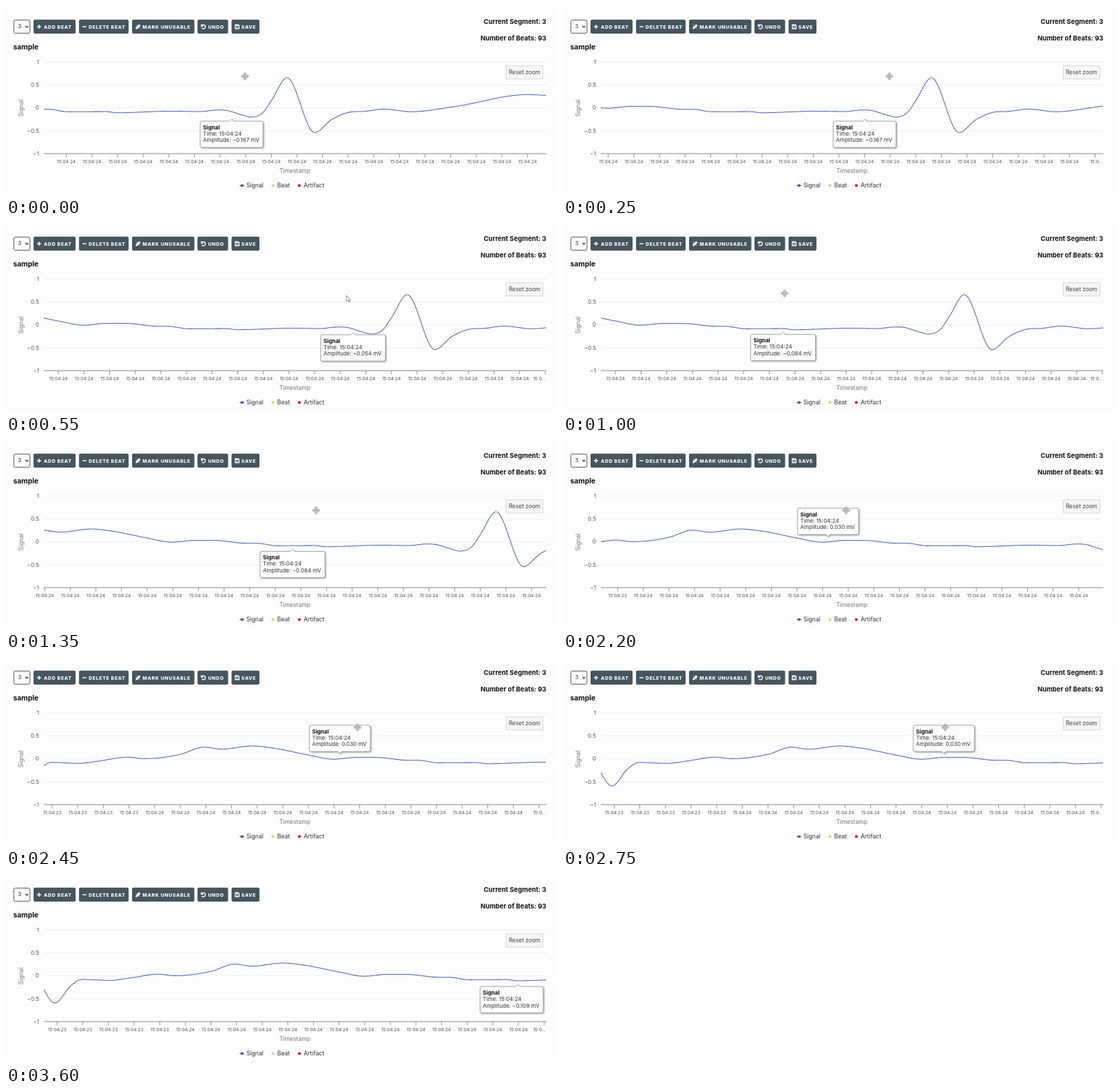
An HTML page that plays this animation: 800x274 px, repeating every 3650 ms.

```html
<!DOCTYPE html>
<html lang="en">
<head>
<meta charset="utf-8">
<title>Signal chart</title>
<style>
  html, body { margin: 0; width: 100%; height: 100%; overflow: hidden; background: #fdfcfe; }
  svg { display: block; width: 100vw; height: 100vh; font-family: Inter, "Open Sans", sans-serif; }
  .head { font-weight: 700; font-size: 9.5px; fill: #111; }
  .btn text { font-weight: 800; font-size: 6.8px; letter-spacing: .75px; fill: #fff; }
  .btn path { stroke: #fff; fill: none; stroke-width: 1.4; }
  .btn .solid { fill: #fff; stroke-width: .5; }
  .axis { font-size: 8.2px; fill: #555; }
  .name { font-size: 8.6px; fill: #777; }
  .time { font-size: 6.6px; fill: #555; text-anchor: middle; }
  .key { font-size: 8.6px; fill: #333; }
  .tip text { font-size: 8px; fill: #333; }
</style>
</head>
<body>
<svg viewBox="0 0 800 274">
  <rect width="800" height="274" fill="#fdfcfe"/>
  <rect x="11.4" y="20.4" width="23.4" height="19" rx="2" fill="#fff" stroke="#444" stroke-width=".9"/>
  <text x="17.6" y="32.4" font-size="7.8" fill="#222">3</text>
  <path d="M28.3 28.9l2 2 2-2" fill="none" stroke="#222" stroke-width="1.2"/>
  <g id="buttons" class="btn"></g>
  <text class="head" x="784.5" y="26" text-anchor="end">Current Segment: 3</text>
  <text class="head" x="784.5" y="49.5" text-anchor="end">Number of Beats: 93</text>
  <text class="head" x="10.5" y="63" style="font-size:10.3px">sample</text>
  <g id="grid"></g>
  <text class="name" x="419.5" y="242" text-anchor="middle">Timestamp</text>
  <text class="name" transform="translate(25.2 148) rotate(-90)" text-anchor="middle">Signal</text>
  <g id="times"></g>
  <path d="M55 214H784.5" stroke="#858a85"/>
  <clipPath id="plot"><rect x="55" y="78" width="729.5" height="138"/></clipPath>
  <g clip-path="url(#plot)">
    <path id="wave" fill="none" stroke="#5366ac" stroke-width="1.05" stroke-linejoin="round"/>
    <circle id="beat" r="2" fill="#efc685"/>
  </g>
  <path d="M339 260.3h7.4" stroke="#4a62ad" stroke-width="1.1"/>
  <g id="legend"></g>
  <rect x="726.2" y="86.8" width="53.4" height="19" fill="#f6f6f7" stroke="#d2d2d4" stroke-width=".9"/>
  <text x="752.9" y="99.2" font-size="8.3" fill="#444" text-anchor="middle">Reset zoom</text>
  <g id="tip" class="tip">
    <path id="box" fill="#fdfdfd" stroke="#999" stroke-width=".8" style="filter:drop-shadow(1px 1px 1px rgba(0,0,0,.4))"/>
    <text x="4" y="11.6" font-weight="700" style="fill:#111">Signal</text>
    <text x="4" y="21">Time: 15:04:24</text>
    <text id="amp" x="4" y="30.4"></text>
  </g>
  <g id="cursor" fill="#fff" stroke="#777" stroke-width=".8" stroke-linejoin="round">
    <path id="arrow" d="M0 0V8.6L2 6.8 3.5 9.8 4.8 9.2 3.4 6.3H6Z"/>
    <path id="move" d="M0-5.4L2-3.2H.7V-.7H3.2V-2L5.4 0 3.2 2V.7H.7V3.2H2L0 5.4-2 3.2H-.7V.7H-3.2V2L-5.4 0-3.2-2V-.7H-.7V-3.2H-2Z"/>
  </g>
</svg>
<script>
const LOOP = 3650, STEP = 50, LEFT = 55, RIGHT = 784.5;
const PAN_LAG = 65, HOVER_LAG = 30;
const $ = id => document.getElementById(id);

function add(parent, tag, attrs, text) {
  const el = document.createElementNS("http://www.w3.org/2000/svg", tag);
  for (const k in attrs) el.setAttribute(k, attrs[k]);
  if (text) el.textContent = text;
  return parent.appendChild(el);
}

// Cubic through [x, y] points, level at every peak and dip.
function smooth(p) {
  const gap = i => p[i + 1][0] - p[i][0];
  const slope = i => (p[i + 1][1] - p[i][1]) / gap(i);
  const tan = p.map((_, i) => {
    if (i === 0) return slope(0);
    if (i === p.length - 1) return 0;
    const a = slope(i - 1), b = slope(i), g = gap(i - 1), h = gap(i);
    return a * b <= 0 ? 0 : (a * h + b * g) / (g + h);
  });
  return x => {
    const i = Math.max(0, p.findIndex(q => q[0] > x) - 1);
    const h = gap(i), u = (x - p[i][0]) / h, v = 1 - u;
    return v * v * (1 + 2 * u) * p[i][1] + u * u * (3 - 2 * u) * p[i + 1][1]
      + h * u * v * (v * tan[i] - u * tan[i + 1]);
  };
}

// Key points of the trace: chart x, microvolts.
const signal = smooth([
  [-535, -100], [-511, -594], [-488, -220], [-472, -80], [-432, -102], [-400, -45],
  [-361, 35], [-337, 2], [-284, 98], [-250, 252], [-225, 209], [-180, 278],
  [-150, 233], [-99, 83], [-62, -10], [-29, 30], [8, 24], [39, -29], [66, -38],
  [90, -88], [145, -84], [161, -109], [240, -75], [282, -83], [306, -50], [318, -54],
  [345, -167], [355, -203], [374, -90], [386, 173], [408, 654], [448, -541],
  [473, -256], [497, -102], [520, -80], [549, -29], [588, -87], [650, 22], [757, 286], [800, 262]
]);
const toY = uv => 147.5 - uv * .0665;

// Each drag moves the trace by dist; the hand holds it at chart x grab.
const drags = [
  { from: -120, to: 430, dist: 196.7, grab: 345 },
  { from: 988, to: 1578, dist: 191, grab: 145 },
  { from: 1880, to: 2694, dist: 216.5, grab: -29 }
];
// Between drags the hand travels to the next spot.
const trips = [
  { from: 430, to: 930, spot: 145 },
  { from: 1578, to: 1880, spot: -29 },
  { from: 3310, to: 3560, spot: 161 }
];
const ease = (t, { from, to }) => {
  const u = Math.min(1, Math.max(0, (t - from) / (to - from)));
  return (1 - Math.cos(Math.PI * u)) / 2;
};
const pan = t => drags.reduce((x, d) => x + d.dist * ease(t, d), -22.2);
const hover = t => trips.reduce((x, trip) => x + (trip.spot - x) * ease(t, trip), drags[0].grab);

[
  [40, 61, "ADD BEAT", "M45 30h6M48 27v6"],
  [106, 72, "DELETE BEAT", "M111 30h6"],
  [183, 90.5, "MARK UNUSABLE", "M188.4 33.2l.6-2.4 4.2-4.2 2 2-4.2 4.2zM188.6 27l6.6 6", "solid"],
  [278, 44.5, "UNDO", "M283.6 26.4v2.8h2.8M284 28.8a2.9 2.9 0 1 1 .3 3"],
  [327.5, 40.5, "SAVE", "M333 27.2h4.2l1.2 1.2v4.4H333zM334.2 28.6h2.4M335 31.1h1.4"]
].forEach(([x, w, label, d, kind = ""]) => {
  const g = $("buttons");
  add(g, "rect", { x, y: 19.8, width: w, height: 20.2, rx: 2, fill: "#46555e" });
  add(g, "path", { d, class: kind });
  add(g, "text", { x: x + w / 2 + 4.8, y: 32.5, "text-anchor": "middle" }, label);
});

["1", "0.5", "0", "−0.5", "−1"].forEach((label, i) => {
  const y = 81.2 + i * 33.2;
  if (i < 4) add($("grid"), "path", { d: `M${LEFT} ${y}H${RIGHT}`, stroke: "#ecebee", "stroke-width": .8 });
  add($("grid"), "text", { class: "axis", x: 48, y: y + 2.8, "text-anchor": "end" }, label);
});

[["Signal", 342.7, "#3f57a5"], ["Beat", 387.5, "#efc685"], ["Artifact", 425.9, "#cc0a1c"]].forEach(([label, cx, fill]) => {
  add($("legend"), "circle", { cx, cy: 260.3, r: 2, fill });
  add($("legend"), "text", { class: "key", x: cx + 6.3, y: 263.2 }, label);
});

const ticks = Array.from({ length: 21 }, () => ({
  mark: add($("times"), "path", { d: "M0 214v5.5", stroke: "#858a85", "stroke-width": .9 }),
  text: add($("times"), "text", { class: "time", y: 228 })
}));

function drawTicks(shift) {
  const gap = 37.2, base = 87.6 + shift, first = Math.ceil((LEFT - base) / gap);
  ticks.forEach(({ mark, text }, i) => {
    const k = first + i, x = base + k * gap, cut = x > 772;
    const show = x <= RIGHT ? "visible" : "hidden";
    mark.setAttribute("visibility", show);
    text.setAttribute("visibility", show);
    mark.setAttribute("transform", `translate(${x} 0)`);
    text.setAttribute("x", cut ? 774.5 : x);
    text.textContent = cut ? "15:0…" : k <= -12 ? "15:04:23" : "15:04:24";
  });
}

function drawWave(shift) {
  const pts = [];
  for (let x = LEFT; x <= RIGHT; x += 1.5) pts.push(x + " " + toY(signal(x - shift)).toFixed(2));
  $("wave").setAttribute("d", "M" + pts.join("L"));
  $("beat").setAttribute("cx", 408 + shift);
  $("beat").setAttribute("cy", toY(signal(408)));
}

function drawTip(t) {
  const uv = Math.round(signal(hover(t)));
  $("amp").textContent = `Amplitude: ${uv < 0 ? "−" : ""}${(Math.abs(uv) / 1000).toFixed(3)} mV`;
  const at = hover(t - HOVER_LAG), value = signal(at), px = at + pan(t - PAN_LAG);
  const up = value >= 0, h = 38, w = $("amp").getComputedTextLength() + 9.5;
  const x = Math.min(px - w / 2, 780 - w), y = toY(value) + (up ? -8.5 - h : 8.4);
  const a = px - x;
  const top = up ? "" : `H${a - 3}L${a} -3L${a + 3} 0`;
  const bottom = up ? `H${a + 3}L${a} ${h + 3}L${a - 3} ${h}` : "";
  $("box").setAttribute("d", `M2 0${top}H${w - 2}q2 0 2 2V${h - 2}q0 2-2 2${bottom}H2q-2 0-2-2V2q0-2 2-2Z`);
  $("tip").setAttribute("transform", `translate(${x} ${y})`);
}

function drawCursor(t) {
  const drag = drags.some(d => t >= d.from && t < d.to + 100);
  const gone = t >= trips[2].to - STEP;
  $("arrow").setAttribute("visibility", drag || gone ? "hidden" : "visible");
  $("move").setAttribute("visibility", drag ? "visible" : "hidden");
  $("cursor").setAttribute("transform", `translate(${hover(t) + pan(t) + 2} ${drag ? 102 : 105})`);
}

function draw(now) {
  const t = Math.floor(now % LOOP / STEP) * STEP, shift = pan(t);
  drawTicks(shift);
  drawWave(shift);
  drawTip(t);
  drawCursor(t);
}

const start = performance.now();
function loop() {
  draw(performance.now() - start);
  requestAnimationFrame(loop);
}
loop();
</script>
</body>
</html>
```
